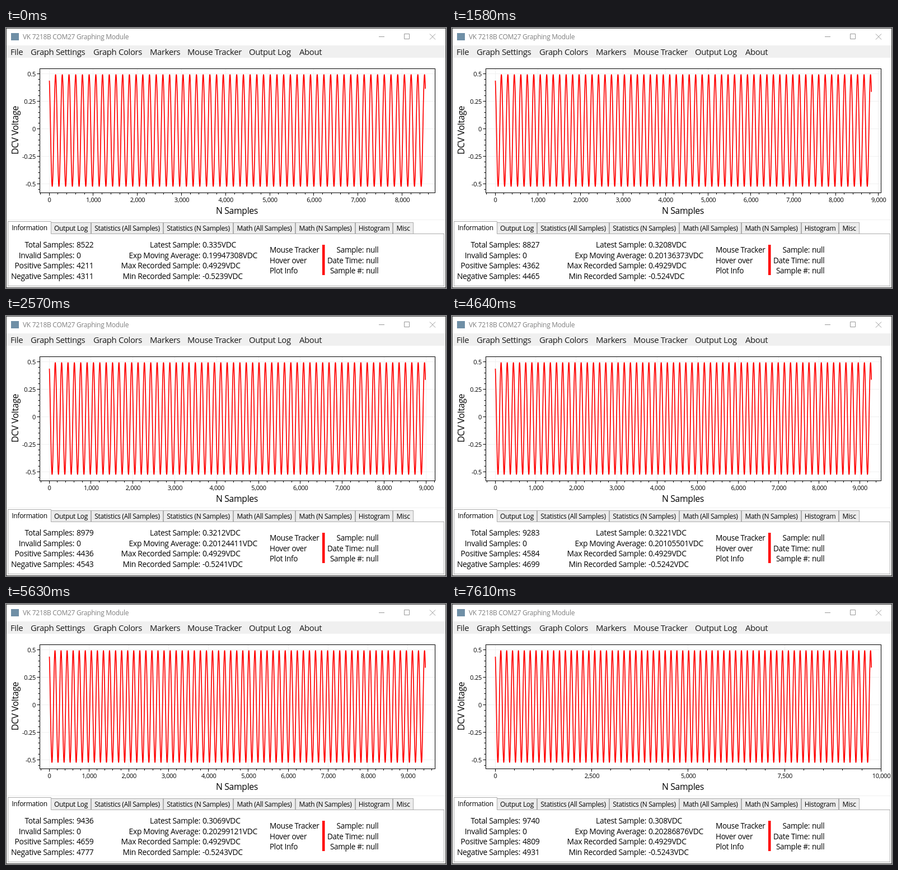
These frames come from a looping animation (786x463 px, 8 s). An HTML page:

```html
<!DOCTYPE html>
<html lang="en">
<head>
<meta charset="utf-8">
<title>Graphing Module</title>
<style>
  html, body { margin: 0; width: 100%; height: 100%; overflow: hidden; background: #fff; }
  svg { display: block; width: 786px; height: 463px; }
  text { font-family: "Open Sans", "Noto Sans", sans-serif; letter-spacing: -.024em; white-space: pre; }
</style>
</head>
<body>
<svg id="stage" viewBox="0 0 786 463"></svg>
<script>
const LOOP = 8000;
// start ms, total, positive, moving average, minimum, latest
const STEPS = [
  [0, 8522, 4211, '0.19947308', '-0.5239', '0.335'],
  [590, 8674, 4286, '0.19940217', '-0.524', '0.3355'],
  [1580, 8827, 4362, '0.20136373', '-0.524', '0.3208'],
  [2570, 8979, 4436, '0.20124411', '-0.5241', '0.3212'],
  [3580, 9131, 4510, '0.20112865', '-0.5242', '0.3216'],
  [4640, 9283, 4584, '0.20105501', '-0.5242', '0.3221'],
  [5630, 9436, 4659, '0.20299121', '-0.5243', '0.3069'],
  [6620, 9588, 4734, '0.20292958', '-0.5243', '0.3073'],
  [7610, 9740, 4809, '0.20286876', '-0.5243', '0.308']
];
const BOX = { l: 60.5, t: 72.5, r: 766.5, b: 293.5 };
const X0 = 77, SPAN = 671.7, Y0 = 179.5, PER_VOLT = 195.6;
const PERIOD = 152.03, SHIFT = 11.28, MID = -0.0155, AMP = 0.5084;

const stage = document.getElementById('stage');

function add(tag, attrs, parent = stage) {
  const el = document.createElementNS('http://www.w3.org/2000/svg', tag);
  for (const k in attrs) el.setAttribute(k, attrs[k]);
  parent.appendChild(el);
  return el;
}
function rect(x, y, width, height, fill, stroke = 'none') {
  return add('rect', { x, y, width, height, fill, stroke });
}
function line(d, stroke, width = 1, parent = stage) {
  return add('path', { d, stroke, 'stroke-width': width, fill: 'none' }, parent);
}
function label(str, x, y, size, anchor = 'start', fill = '#000', parent = stage) {
  const el = add('text', { x, y, 'font-size': size, 'text-anchor': anchor, fill }, parent);
  el.textContent = str;
  return el;
}
const crisp = v => Math.floor(v) + 0.5;
const yOf = v => Y0 - v * PER_VOLT;
const volt = n => MID + AMP * Math.cos(2 * Math.PI * (n + SHIFT) / PERIOD);

// Window, title bar and menu
rect(0, 0, 786, 463, '#fff');
rect(9, 9, 14, 13, '#6f8fa6');
label('VK 7218B COM27 Graphing Module', 30, 20, 12, 'start', '#808080');
line('M666 15.5H676M711.5 10.5H720.5V19.5H711.5ZM757 10.5L767 20.5M767 10.5L757 20.5', '#999');
rect(1, 31, 784, 22, '#f0f0f0');
[['File', 8], ['Graph Settings', 44], ['Graph Colors', 156], ['Markers', 257],
 ['Mouse Tracker', 324], ['Output Log', 434], ['About', 524]]
  .forEach(([s, x]) => label(s, x, 48, 14.9, 'start', '#1a1a1a'));

// Plot
const grid = add('g', {});
const wave = add('path', { fill: 'none', stroke: '#f00', 'stroke-width': 1.7, 'stroke-linejoin': 'round' });
const ticks = add('g', {});
rect(BOX.l, BOX.t, BOX.r - BOX.l, BOX.b - BOX.t, 'none', '#000');
let yTicks = '';
for (let i = -11; i <= 10; i++) {
  const y = crisp(yOf(i * 0.05));
  yTicks += `M${BOX.l} ${y}h${i % 5 ? -3 : -5}`;
  if (i % 5 === 0) label(String(i * 5 / 100), 53, y + 4, 11, 'end');
}
line(yTicks, '#000');
label('N Samples', 412.5, 331, 15.8, 'middle');
add('text', { transform: 'translate(21.5 182) rotate(-90)', 'font-size': 16, 'text-anchor': 'middle' })
  .textContent = 'DCV Voltage';

// Tabs
line('M1 341.5H785', '#f0f0f0');
rect(3.5, 366.5, 779, 93, '#fff', '#acacac');
const edges = [80, 152, 281, 406, 517, 624, 691, 728];
['Output Log', 'Statistics (All Samples)', 'Statistics (N Samples)', 'Math (All Samples)',
 'Math (N Samples)', 'Histogram', 'Misc'].forEach((s, i) => {
  const a = edges[i], b = edges[i + 1];
  rect(a + 0.5, 346.5, b - a - 1, 20, '#ececec', '#acacac');
  label(s, (a + b) / 2, 361, 12, 'middle');
});
line('M3.5 367V344.5H80.5V366.5', '#acacac').setAttribute('fill', '#fff');
line('M4 366.5H80', '#fff');
label('Information', 42, 360, 12, 'middle');

// Information page
const ROWS = [391, 410, 428, 447], TRACK = [400, 419, 437];
function column(names, right, rows, size) {
  return names.map((s, i) => {
    label(s + ':', right, rows[i], size, 'end');
    return label('', right + 4, rows[i], size);
  });
}
const counts = column(['Total Samples', 'Invalid Samples', 'Positive Samples', 'Negative Samples'], 122, ROWS, 13.9);
const values = column(['Latest Sample', 'Exp Moving Average', 'Max Recorded Sample', 'Min Recorded Sample'], 347, ROWS, 13.9);
['Mouse Tracker', 'Hover over', 'Plot Info'].forEach((s, i) => label(s, 471, TRACK[i], 13.6));
rect(565, 386, 4.5, 54, '#f00');
column(['Sample', 'Date Time', 'Sample #'], 639, TRACK, 13.6).forEach(el => el.textContent = 'null');

// Window edge
rect(0.5, 0.5, 785, 462, 'none', '#3c3c3c');

function wavePath(total) {
  const scale = SPAN / total;
  let d = '';
  for (let n = 0; n < total; n += 2) {
    d += `${n ? 'L' : 'M'}${(X0 + 0.5 + n * scale).toFixed(2)} ${yOf(volt(n)).toFixed(2)}`;
  }
  return d;
}

function drawAxis(total) {
  const scale = SPAN / total, major = total > 9700 ? 2500 : 1000, minor = major / 5;
  grid.replaceChildren();
  ticks.replaceChildren();
  let g = '', t = '';
  for (let i = -2; i <= 60; i++) {
    const n = i * minor, x = X0 + n * scale;
    if (x < BOX.l || x > BOX.r + 0.5) continue;
    const px = crisp(x), big = i % 5 === 0;
    t += `M${px} ${BOX.b}v${big ? 5 : 3}`;
    if (!big) continue;
    g += `M${px} ${BOX.t}V${BOX.b}`;
    label(n.toLocaleString('en-US'), x + 0.5, 310, 11, 'middle', '#000', ticks);
  }
  for (let i = -2; i <= 2; i++) g += `M${BOX.l} ${crisp(yOf(i / 4))}H${BOX.r}`;
  line(g, '#f1f1f1', 1, grid);
  line(t, '#000', 1, ticks);
}

function show([, total, pos, avg, min, latest]) {
  wave.setAttribute('d', wavePath(total));
  drawAxis(total);
  [total, 0, pos, total - pos].forEach((v, i) => counts[i].textContent = v);
  [latest, avg, '0.4929', min].forEach((v, i) => values[i].textContent = v + 'VDC');
}

const start = performance.now();
let shown = null;
function tick() {
  const t = Math.max(0, performance.now() - start) % LOOP;
  const step = STEPS.filter(s => s[0] <= t).pop();
  if (step !== shown) show(shown = step);
  requestAnimationFrame(tick);
}
tick();
</script>
</body>
</html>
```
